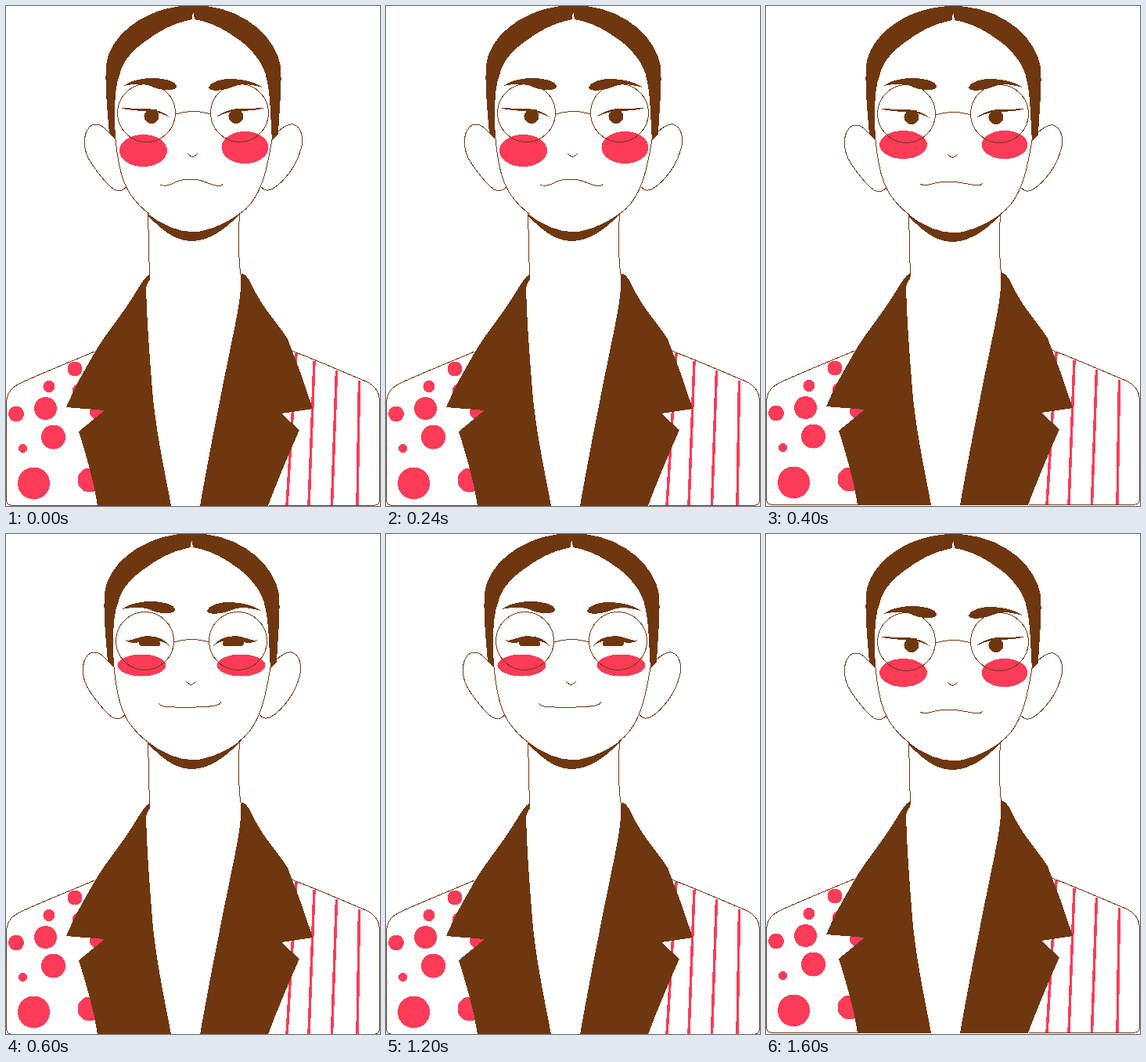
Animation, 478 px wide and 638 px high, one loop 1.8 s. Source, as an HTML page:

```html
<!DOCTYPE html>
<html lang="en">
<head>
<meta charset="utf-8">
<title>Portrait</title>
<style>
  html, body { margin: 0; width: 100%; height: 100%; overflow: hidden; background: #fff; }
  svg { display: block; }
  .line { fill: none; stroke: #6f3710; stroke-width: 1; }
  .ink { fill: #6f3710; }
  .pink { fill: #fb3b57; }
  .stripes { stroke: #fb3b57; stroke-width: 3.5; fill: none; }
</style>
</head>
<body>
<svg width="478" height="638" viewBox="0 0 478 638" shape-rendering="crispEdges">
  <g id="body">
    <g id="dots" class="pink"></g>
    <path class="stripes" d="M371 443L359 637M394 453L387 637M422.5 465L416.5 637M451.5 478L449 637"/>
    <path class="line" d="M113 441C80 455 30 475 15 483Q.5 491 .5 507V630Q.5 637.3 8 637.3H117
      M365 440C400 453 440 471 460 479Q477.500 487 477.500 505V630Q477.500 637.300 470 637.300H336"/>
    <path class="ink" d="M184 342C178 345 172 355 168 362C150 392 130 415 117 436C103 460 88 485 77 512L126 516L93 543
      C103 575 112 605 117 637.500H211C204 600 191 540 187 490C183 440 180 400 179 360Q182 350 184 349Z
      M301 341C310 343 313 355 318 364C330 388 350 408 360 425C372 455 383 485 392 514L352 520L375 541
      C360 575 346 608 335 637.500H248C258 580 270 520 281 465C292 410 302 370 300 345Z"/>
  </g>
  <g id="neck">
    <path class="line" d="M181.500 266C182.500 290 182 320 184 345M298.500 264C296.500 300 297.500 325 300 343"/>
    <path class="ink" d="M181 265C200 280 220 288 240 288.500C262 287 285 275 301 263C285 281 262 300.500 237 300C215 299.500 198 285 181 267Z"/>
  </g>
  <ellipse id="leftCheek" class="pink"/>
  <ellipse id="rightCheek" class="pink"/>
  <path id="brows" class="ink" d="M150 102C160 94 175 92 190 92C205 93 217 96 218.500 103C217 108 203 108 192 105C182 101 175 97 150 102Z
    M258.500 104C262 97 275 92 290 93C308 94 320 98 328 104C303 97 295 101 285 105C275 108 262 110 258.500 104Z"/>
  <g id="head">
    <path class="ink" d="M128 75C132 38 178 -1 240 -1C300 -1 345 38 351 77C353 105 349 135 348 163L340 171
      C338 145 338 110 333 93C331 75 312 52 296 42C276 27 258 20 241 17L239 6L238 17
      C210 23 195 33 181 43C158 58 148 75 146 85C137 105 139 145 140 171L132 163C130 135 126 105 128 75Z"/>
    <g class="line">
      <path d="M140 170C143 200 148 230 165 248Q173 258 184 266M340 170C335 200 329 231 315 249Q309 258 299 265"/>
      <path d="M140 169L128 158C120 149 111 150 107 154C97 165 99 185 108 199C115 210 128 227 138 234C145 237 151 235 153.500 231
        M340 168C350 157 360 150 367 151C378 154 381 170 377 182C372 203 355 225 341 233C336 236 330 236 326.500 231"/>
      <circle cx="179.500" cy="136.500" r="37"/>
      <circle cx="298.500" cy="136.500" r="37"/>
      <path d="M216.500 138Q239 131 261.500 138M232 188.500Q236 191.500 238 192.500H239Q242 190.500 245 188.500"/>
      <path id="mouth"/>
    </g>
    <g id="open" class="ink">
      <path id="lid" d="M146 130Q165 131 178 130.500Q198 132 211 143Q198 135.500 182 134Q160 134 146 130Z"/>
      <use href="#lid" transform="translate(477.500) scale(-1 1)"/>
      <path d="M178 134H194A9.500 9.500 0 1 1 178 134ZM286 134H302A9.500 9.500 0 1 1 286 134Z" transform="translate(0 1.500)"/>
      <path d="M179 132H193V137H179ZM287 132H301V137H287Z"/>
    </g>
    <g id="smiling" class="ink">
      <path id="squint" d="M154 135C162 138 169 131 182 130C197 130 207 136 211 143Q204 137 198 137Q201 143 195 143H177Q171 143 172 138Q162 141 154 135Z"/>
      <use href="#squint" transform="translate(478) scale(-1 1)"/>
    </g>
  </g>
</svg>
<script>
const el = id => document.getElementById(id);
const set = (id, attrs) => {
  for (const name in attrs) el(id).setAttribute(name, attrs[name]);
};

// x, y, radius
const dots = [
  [88, 463, 9.5], [55, 485.5, 7.5], [13, 520.5, 10], [50.5, 513.5, 14.5], [60.5, 550, 15.5],
  [21.5, 564.5, 5.5], [35.5, 609, 20.5], [93, 490, 8], [117, 518, 10], [107, 605, 15.5]
];
el("dots").innerHTML = dots.map(([x, y, r]) => `<circle cx="${x}" cy="${y}" r="${r}"/>`).join("");

// Offsets are [x, y]; cheeks are [cx, cy, rx, ry].
const stern = {
  head: [0, 0], brows: [0, 0], neck: [0, 0], body: [0, 0],
  leftCheek: [175.5, 184.5, 30.5, 20.5], rightCheek: [305.5, 180.5, 30, 20.5],
  mouth: "M197 228Q204 231 212 227C222 221 230 221 240 221C252 222 260 228 268 229Q276 231 277 227"
};
const neutral = {
  head: [0, 1], brows: [0, 0], neck: [1, 1], body: [0, -1],
  leftCheek: [175.5, 177, 30.5, 18], rightCheek: [305, 177, 29.5, 18],
  mouth: "M197 226Q202 229 212 226C225 222 245 223 258 226Q274 230 277 225"
};
const happy = {
  head: [-2, 0], brows: [-2, -6], neck: [0, 0], body: [0, 1], smiling: true,
  leftCheek: [173.5, 167.5, 31, 14], rightCheek: [300.5, 167.5, 31, 14],
  mouth: "M197 216Q200 220 208 220.500Q237 222.500 267 219.500Q276 218 277 214"
};

function poseAt(t) {
  if (t < 400) return stern;
  return t < 600 || t >= 1600 ? neutral : happy;
}

function draw(pose) {
  for (const part of ["head", "brows", "neck", "body"]) set(part, { transform: `translate(${pose[part]})` });
  for (const cheek of ["leftCheek", "rightCheek"]) {
    const [cx, cy, rx, ry] = pose[cheek];
    set(cheek, { cx, cy, rx, ry });
  }
  set("mouth", { d: pose.mouth });
  set("open", { display: pose.smiling ? "none" : "inline" });
  set("smiling", { display: pose.smiling ? "inline" : "none" });
}

const start = performance.now();
function tick() {
  draw(poseAt((performance.now() - start) % 1800));
  requestAnimationFrame(tick);
}
tick();
</script>
</body>
</html>
```
